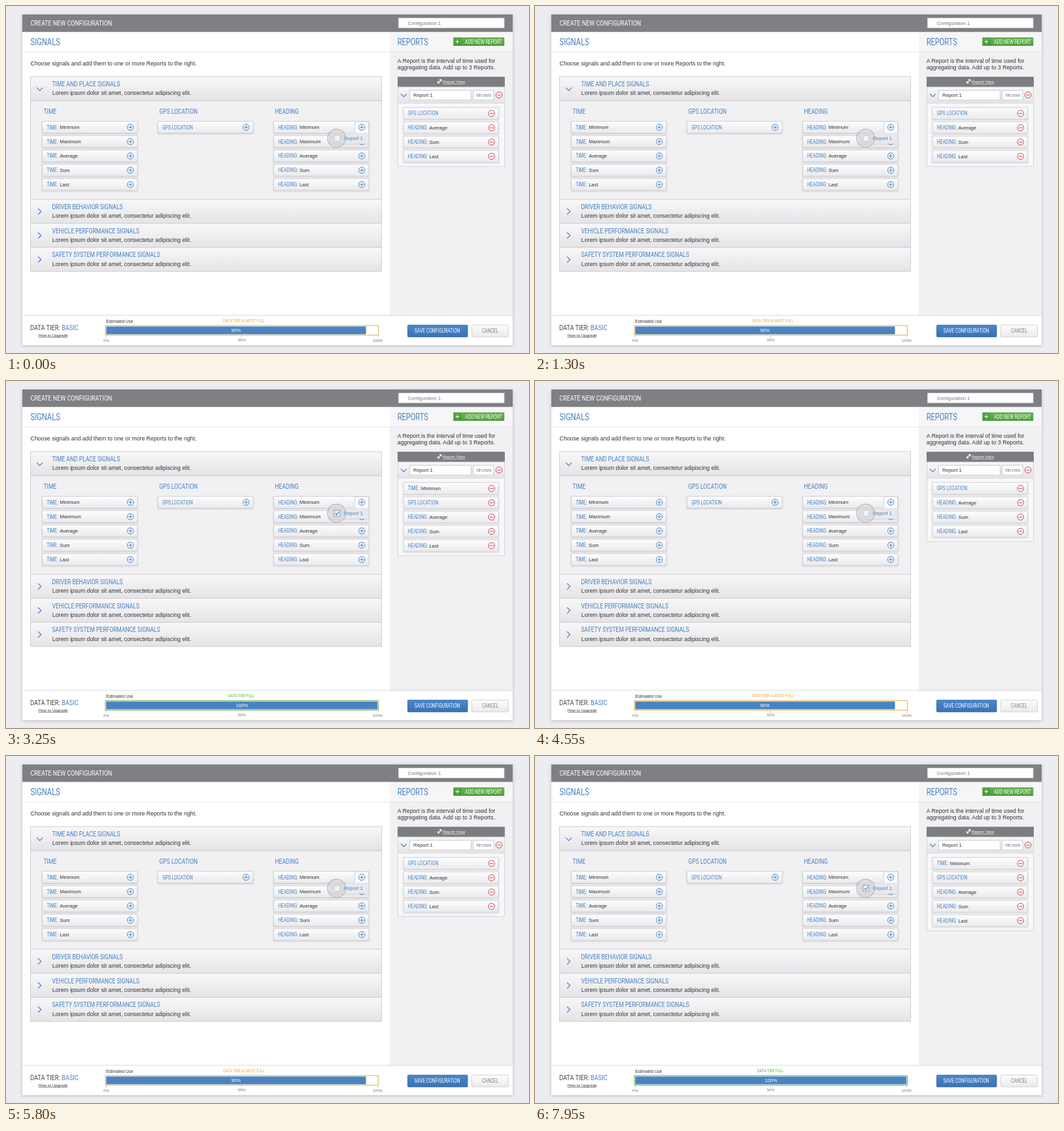
Write an HTML page that moves like this. It is 800 by 531 pixels and loops after 8 s.

```html
<!DOCTYPE html>
<html lang="en">
<head>
<meta charset="utf-8">
<title>Create new configuration</title>
<style>
  html, body { margin: 0; width: 100%; height: 100%; overflow: hidden; background: #edecf0; }
  svg { display: block; width: 100vw; height: 100vh; }
  text { font-family: "Liberation Sans", Arial, sans-serif; }
  .cond { font-family: Roboto, "Open Sans", sans-serif; }
  .mid { text-anchor: middle; }
  .link { text-decoration: underline; }
  .full .low, svg:not(.full) .high { display: none; }
</style>
</head>
<body>
<svg id="stage" viewBox="0 0 800 531">
  <defs>
    <linearGradient id="head" x2="0" y2="1"><stop stop-color="#f8f8fa"/><stop offset="1" stop-color="#e4e4e7"/></linearGradient>
    <linearGradient id="row" x2="0" y2="1"><stop stop-color="#fdfdfe"/><stop offset="1" stop-color="#eaeaed"/></linearGradient>
    <linearGradient id="blue" x2="0" y2="1"><stop stop-color="#4a87ca"/><stop offset="1" stop-color="#3972b6"/></linearGradient>
    <linearGradient id="green" x2="0" y2="1"><stop stop-color="#69b450"/><stop offset="1" stop-color="#4f9d3b"/></linearGradient>
    <filter id="soft" x="-10%" y="-20%" width="120%" height="160%"><feDropShadow dx="0" dy="1" stdDeviation=".8" flood-opacity=".16"/></filter>
    <filter id="frame" x="-5%" y="-5%" width="110%" height="110%"><feDropShadow dx="0" dy="1" stdDeviation="2.5" flood-opacity=".22"/></filter>
  </defs>
</svg>
<script>
const BLUE = '#4780bf', INK = '#333336', RED = '#c9444d', AMBER = '#e9ad3f', GREEN = '#62af4c';

const rect = (x, y, w, h, fill, extra = '') =>
  `<rect x="${x}" y="${y}" width="${w}" height="${h}" fill="${fill}" ${extra}/>`;
const path = (d, stroke, width = 1) =>
  `<path d="${d}" fill="none" stroke="${stroke}" stroke-width="${width}"/>`;
const text = (x, y, size, str, fill = INK, cls = '') =>
  `<text x="${x}" y="${y}" font-size="${size}" fill="${fill}" class="${cls}">${str}</text>`;
// Headings share one condensed face.
const cond = (x, y, size, str, fill = BLUE, cls = '') =>
  `<text transform="translate(${x} ${y}) scale(.8 1)" font-size="${size}" fill="${fill}" class="cond ${cls}">${str}</text>`;
const group = (cls, ...parts) => `<g class="${cls}">${parts.join('')}</g>`;
const border = color => `stroke="${color}" stroke-width="1"`;

function icon(x, y, color, plus) {
  return `<circle cx="${x}" cy="${y}" r="4.7" fill="#fff" fill-opacity=".6" stroke="${color}"/>` +
    path(`M${x - 2.8} ${y}h5.6` + (plus ? `M${x} ${y - 2.8}v5.6` : ''), color);
}

function signal(x, y, label, value, color, plus) {
  const w = 145.5, name = value ? label + ':' : label;
  return rect(x, y, w, 18, 'url(#row)', border('#d3d3d7') + ' filter="url(#soft)"') +
    cond(x + 6.7, y + 12.1, 8.5, name) +
    (value ? text(x + (label === 'TIME' ? 26.7 : 39.4), y + 11.8, 7.5, value) : '') +
    icon(x + 134.7, y + 9.1, color, plus);
}

function column(x, title, label, values) {
  return cond(x + 2, 164.8, 10.7, title) +
    values.map((v, i) => signal(x, 176.5 + i * 21.9, label, v, BLUE, true)).join('');
}

function section(y, h, title, open) {
  const cy = y + h / 2;
  return rect(37.5, y, 537, h, 'url(#head)', border('#cfcfd3')) +
    path(open ? `M47 ${cy - 1.5}l4.6 4.6l4.6 -4.6` : `M49 ${cy - 4.5}l4.6 4.7l-4.6 4.7`, BLUE, 1.2) +
    cond(70.5, y + 14.9, 10.7, title) +
    text(70.8, y + 28.2, 8.73, 'Lorem ipsum dolor sit amet, consectetur adipiscing elit.');
}

function reportList(cls, items) {
  const bottom = items.length * 21.7 + 158.7;
  return group(cls,
    rect(599.5, 124, 163, bottom - 124, '#f8f8fa', border('#d6d6da')),
    ...items.map(([label, value], i) => signal(608, 155.3 + i * 21.9, label, value, RED, false)));
}

function meter(cls, color, percent, title, titleX) {
  const end = 153.5 + percent * 4.152 - (percent < 100 ? 0 : .5);
  return group(cls,
    cond(titleX, 484.4, 7, title, color),
    rect(152, 489, 417.5, 14.8, '#fff', border(color)),
    rect(153.3, 490.4, (percent < 100 ? 550.6 : end) - 153.3, 12, '#4a83c2'),
    text((153 + (percent < 100 ? 550.5 : 569)) / 2, 499.3, 7.3, percent + '%', '#fff', 'mid'));
}

function header() {
  return rect(25, 13, 750, 506, '#fff', 'filter="url(#frame)"') +
    rect(587, 40, 188, 435, '#f1f1f4') +
    rect(25, 40, 750, 30.5, '#fff', 'fill-opacity=".35"') +
    rect(25, 70, 750, 1, '#e7e7ea') +
    rect(25, 13, 750, 26.7, '#7f8083') +
    cond(37.5, 29.9, 11.2, 'CREATE NEW CONFIGURATION', '#fff') +
    rect(600.5, 18.5, 161.5, 15, '#fff', border('#d2d2d5')) +
    text(614.7, 29, 7.45, 'Configuration 1', '#77777a') +
    cond(37.5, 59.8, 14, 'SIGNALS') +
    cond(598.7, 59.8, 13.8, 'REPORTS') +
    rect(684.3, 48, 78, 13, 'url(#green)', 'rx="1"') +
    rect(684.3, 48, 12.5, 13, '#3f8c2c', 'fill-opacity=".35"') +
    path('M687.6 54.5h5.6M690.4 51.7v5.6', '#fff') +
    cond(702, 57.6, 8.55, 'ADD NEW REPORT', '#fff');
}

function signals() {
  const stats = ['Minimum', 'Maximum', 'Average', 'Sum', 'Last'];
  return text(37.6, 91.2, 8.74, 'Choose signals and add them to one or more Reports to the right.') +
    rect(37.5, 145, 537, 151, '#f1f1f4', border('#cfcfd3')) +
    section(108, 36.8, 'TIME AND PLACE SIGNALS', true) +
    section(295.8, 36.8, 'DRIVER BEHAVIOR SIGNALS') +
    section(332.6, 36.8, 'VEHICLE PERFORMANCE SIGNALS') +
    section(369.4, 36.8, 'SAFETY SYSTEM PERFORMANCE SIGNALS') +
    column(55.5, 'TIME', 'TIME', stats) +
    column(232.5, 'GPS LOCATION', 'GPS LOCATION', ['']) +
    column(409.5, 'HEADING', 'HEADING', stats);
}

function popup() {
  return rect(533.5, 177, 21, 18, '#fcfcfd', border('#d3d3d7')) +
    icon(544.2, 185.6, BLUE, true) +
    rect(495, 194.5, 59.5, 16, '#e7e9ed', 'filter="url(#soft)"') +
    text(516.8, 205.3, 7.6, 'Report 1', BLUE) +
    '<circle cx="505.7" cy="202.4" r="14" fill="#b9b9bd" fill-opacity=".28" stroke="#aeaeb2" stroke-opacity=".75" stroke-width="1.2"/>' +
    group('low', rect(502, 198, 9, 9, '#f1f1f2', border('#cbcbce'))) +
    group('high', rect(502, 198, 9, 9, '#f1f4f8', border('#7f9cbd')),
      path('M503.8 202.4l2.1 2.4l3.7 -4.7', BLUE, 1.2));
}

function reports() {
  const items = [['GPS LOCATION', ''], ['HEADING', 'Average'], ['HEADING', 'Sum'], ['HEADING', 'Last']];
  return text(598.8, 87, 8.7, 'A Report is the interval of time used for') +
    text(598.8, 97.2, 8.7, 'aggregating data. Add up to 3 Reports.') +
    reportList('low', items) +
    reportList('high', [['TIME', 'Minimum'], ...items]) +
    rect(599, 108.3, 164, 15.7, '#7c7d80') +
    path('M660.7 117.8l5 -5M662.9 112.6h2.9v2.9M660.6 115v2.9h2.9', '#fff', 1.1) +
    text(668, 118, 6.25, 'Report View', '#fff', 'link') +
    rect(599.5, 124, 163, 24.7, 'url(#head)', border('#d6d6da')) +
    path('M604 134.4l4.4 4.5l4.4 -4.5', BLUE, 1.2) +
    rect(617.5, 129, 94, 15, '#fff', border('#cacace')) +
    text(623, 139.3, 7.8, 'Report 1') +
    rect(714.5, 129, 31.5, 15, '#fff', border('#cacace')) +
    text(719.7, 139.2, 7.5, 'hh:mm', '#707074') +
    icon(754.1, 136.2, RED, false);
}

function footer() {
  return rect(25, 472.5, 750, 2, '#dcdce0', 'fill-opacity=".6"') +
    rect(25, 474.5, 750, 44.5, '#fff') +
    cond(37, 496, 11.5, `DATA TIER: <tspan fill="${BLUE}">BASIC</tspan>`, '#444447') +
    text(49.7, 505.7, 6.2, 'How to Upgrade', INK, 'link') +
    text(153.2, 485, 6.3, 'Estimated Use') +
    path('M153.5 504v4M360.5 504v4M568.5 504v4', '#d6d6d9') +
    [[153.5, 0], [360.5, 50], [568.5, 100]]
      .map(([x, n]) => text(x, n === 50 ? 513 : 513.5, 6.1, n + '%', '#77777a', 'mid')).join('') +
    meter('low', AMBER, 90, 'DATA TIER ALMOST FULL', 332) +
    meter('high', GREEN, 100, 'DATA TIER FULL', 340) +
    rect(614.5, 488.3, 91.5, 18, 'url(#blue)', border('#3b70b0') + ' rx="1"') +
    cond(624.8, 500.4, 8.45, 'SAVE CONFIGURATION', '#fff') +
    rect(712.5, 488.3, 56, 18, 'url(#row)', border('#d3d3d7') + ' rx="1"') +
    cond(728, 500.4, 8.35, 'CANCEL', '#818185');
}

const stage = document.getElementById('stage');
stage.insertAdjacentHTML('beforeend',
  rect(0, 0, 800, 531, '#edecf0') + header() + signals() + popup() + reports() + footer());

const LOOP = 8000, CYCLE = 2250, CHECK_AT = 100, CHECKED_FOR = 1150;
const start = performance.now();
function tick() {
  const t = (performance.now() - start) % LOOP;
  stage.classList.toggle('full', (t - CHECK_AT + CYCLE) % CYCLE < CHECKED_FOR);
  requestAnimationFrame(tick);
}
tick();
</script>
</body>
</html>
```
